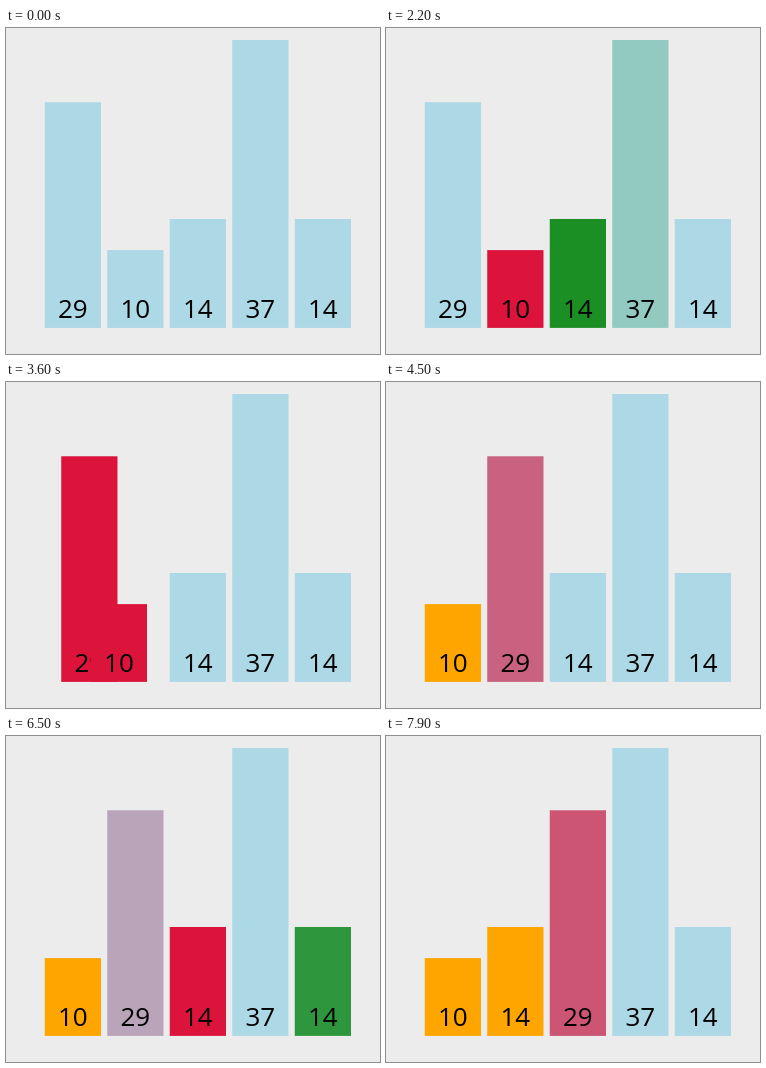
An HTML page that plays this animation: 374x326 px, repeating every 8 s.

```html
<!DOCTYPE html>
<html lang="en">
<head>
<meta charset="utf-8">
<title>Selection sort</title>
<style>
  html, body { margin: 0; width: 100%; height: 100%; overflow: hidden; background: #ececec; }
  svg { display: block; }
  text { font: 26px "Open Sans", "Noto Sans", sans-serif; text-anchor: middle; }
</style>
</head>
<body>
<svg id="stage" width="374" height="326" viewBox="0 0 374 326"></svg>
<script>
const LOOP = 8000, FADE = 250;
const STEP = 62.5, WIDTH = 56.25, LEFT = 38.75, BASE = 299.9, UNIT = 7.78;
const values = [29, 10, 14, 37, 14];

const IDLE = [173, 216, 230], MIN = [220, 20, 60], TEST = [0, 128, 0], DONE = [255, 165, 0];

// Each step: start time, then the new colour or slot of each bar it touches.
const steps = [
  [400, { 0: MIN }],
  [940, { 1: TEST }],
  [1300, { 0: IDLE, 1: MIN }],
  [1800, { 2: TEST }],
  [2116, { 2: IDLE, 3: TEST }],
  [2625, { 3: IDLE, 4: TEST }],
  [3000, { 4: IDLE, 0: MIN }],
  [3500, { 0: 1, 1: 0 }],
  [3835, { 1: DONE, 0: IDLE }],
  [4367, { 0: MIN }],
  [4700, { 2: TEST }],
  [5200, { 0: IDLE, 2: MIN }],
  [5512, { 3: TEST }],
  [6100, { 3: IDLE, 4: TEST }],
  [6400, { 4: IDLE, 0: MIN }],
  [6920, { 0: 2, 2: 1 }],
  [7235, { 2: DONE, 0: IDLE }],
  [7760, { 0: MIN }]
];

function add(parent, tag, attrs) {
  const el = document.createElementNS("http://www.w3.org/2000/svg", tag);
  for (const key in attrs) el.setAttribute(key, attrs[key]);
  return parent.appendChild(el);
}

const bars = values.map(value => {
  const group = add(document.getElementById("stage"), "g");
  const height = value * UNIT;
  const rect = add(group, "rect", { y: BASE - height, width: WIDTH, height });
  add(group, "text", { x: WIDTH / 2, y: 290 }).textContent = value;
  return { group, rect };
});

const ease = u => u < 0.5 ? 4 * u ** 3 : 1 - 4 * (1 - u) ** 3;
const mix = (a, b, k) => a + (b - a) * k;

function draw(t) {
  const state = values.map((_, slot) => ({ slot, color: IDLE }));
  for (const [start, changes] of steps) {
    if (t <= start) break;
    const k = ease(Math.min(1, (t - start) / FADE));
    for (const id in changes) {
      const bar = state[id], goal = changes[id];
      if (Array.isArray(goal)) bar.color = bar.color.map((c, i) => mix(c, goal[i], k));
      else bar.slot = mix(bar.slot, goal, k);
    }
  }
  state.forEach(({ slot, color }, i) => {
    bars[i].group.setAttribute("transform", `translate(${LEFT + STEP * slot} 0)`);
    bars[i].rect.setAttribute("fill", `rgb(${color.map(Math.round)})`);
  });
}

const begin = performance.now();
function frame() {
  draw((performance.now() - begin) % LOOP);
  requestAnimationFrame(frame);
}
frame();
</script>
</body>
</html>
```
